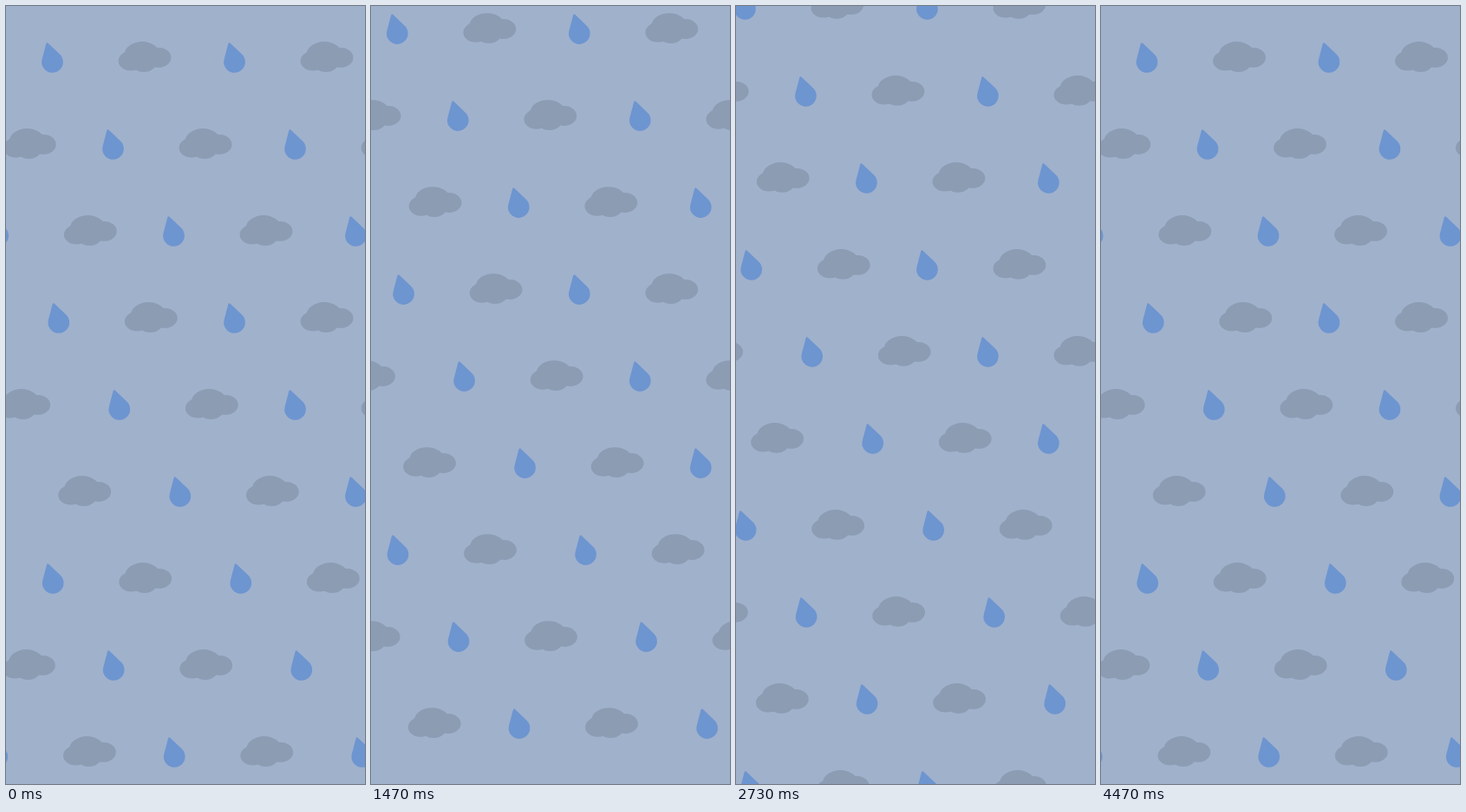
Recreate the animation shown at these times as an HTML page with a canvas. Size 414x896 px, loop 4.5 s.

```html
<!DOCTYPE html>
<html lang="en">
<head>
<meta charset="utf-8">
<title>Rain pattern</title>
<style>
  html, body { margin: 0; width: 100%; height: 100%; overflow: hidden; background: #a0b1cc; }
  canvas { display: block; }
</style>
</head>
<body>
<canvas id="stage" width="414" height="896"></canvas>
<script>
const ctx = document.getElementById('stage').getContext('2d');
const WIDTH = 414, HEIGHT = 896;
const LOOP = 4500, STEP = 30;
const SKY = '#a0b1cc', CLOUD = '#8b9cb3', DROP = '#6d95d0';

// Each diagonal steps right and down by one row; x is where it meets the first row.
const DIAGONALS = [263.5, 53.5, -149.2, -365.8, -570.1];
const ROWS = 11, ROW_X = 70, ROW_Y = 100, TOP = 64.5;
const DRIFT_X = -70.5 / (LOOP - STEP), DRIFT_Y = -100 / (LOOP - STEP);

// Lobes of a cloud: centre and radii, relative to its neighbouring drop.
const LOBES = [
  [90.5, -1.2, 14.4, 11.3],
  [105.5, -0.6, 15, 12],
  [122.5, -5.1, 14.4, 11.4],
  [103.5, -8.4, 20.5, 15]
];

function makeDrop() {
  const radius = 12.3, tipRadius = 1.3, tipX = -5.9, tipY = -20.8;
  const axis = Math.atan2(tipY, tipX);
  const spread = Math.acos((radius - tipRadius) / Math.hypot(tipX, tipY));
  const path = new Path2D();
  path.arc(0, 0, radius, axis + spread, axis - spread + 2 * Math.PI);
  path.arc(tipX, tipY, tipRadius, axis - spread, axis + spread);
  path.closePath();
  return path;
}

function makeCloud() {
  const path = new Path2D();
  for (const [x, y, rx, ry] of LOBES) {
    path.moveTo(x + rx, y);
    path.ellipse(x, y, rx, ry, 0, 0, 2 * Math.PI);
  }
  return path;
}

const drop = makeDrop(), cloud = makeCloud();

function fillAt(path, color, x, y) {
  ctx.setTransform(1, 0, 0, 1, x, y);
  ctx.fillStyle = color;
  ctx.fill(path);
}

function draw() {
  const time = Math.floor((performance.now() % LOOP) / STEP) * STEP;
  ctx.setTransform(1, 0, 0, 1, 0, 0);
  ctx.fillStyle = SKY;
  ctx.fillRect(0, 0, WIDTH, HEIGHT);
  for (let row = 0; row < ROWS; row++) {
    const y = TOP + row * ROW_Y + time * DRIFT_Y;
    for (const start of DIAGONALS) {
      const x = start + row * ROW_X + time * DRIFT_X;
      fillAt(drop, DROP, x, y);
      fillAt(cloud, CLOUD, x, y);
    }
  }
  requestAnimationFrame(draw);
}

draw();
</script>
</body>
</html>
```
